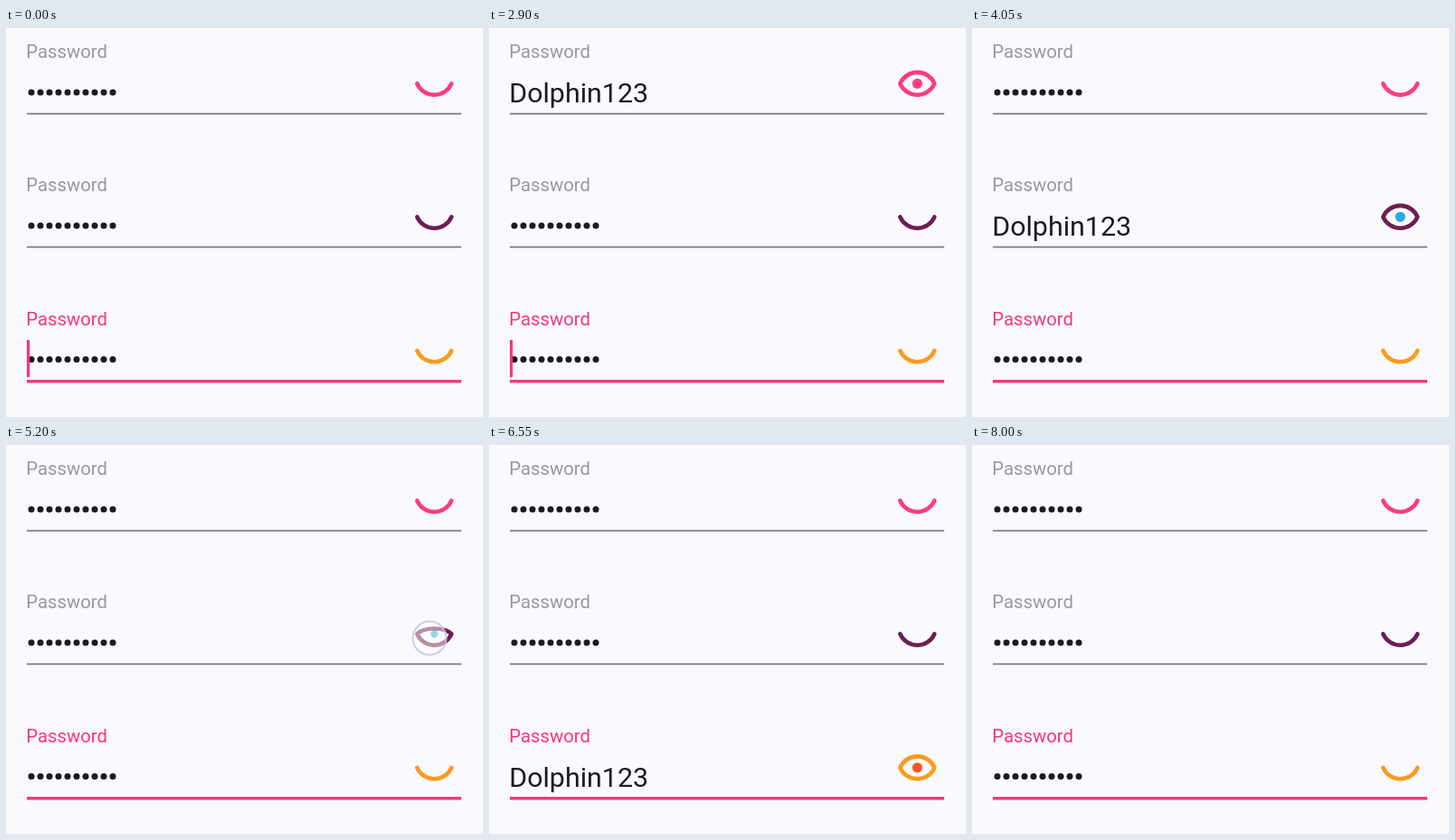
An HTML page for the animation above (8050 ms loop, 527 by 429 pixels).

```html
<!DOCTYPE html>
<html lang="en">
<head>
<meta charset="utf-8">
<title>Password fields</title>
<style>
  html, body { margin: 0; width: 100%; height: 100%; overflow: hidden; background: #faf9fd; }
  svg { display: block; }
  text { font-family: Roboto, sans-serif; }
  .label { font-size: 20.3px; }
  .value { font-size: 30.4px; fill: #1d1a20; }
</style>
</head>
<body>
<svg id="stage" width="527" height="429" viewBox="0 0 527 429"></svg>
<script>
const LOOP = 8050, EYE_MS = 300;
const PINK = '#f5377f', GREY = '#99989c';

// Each tap: press and release times, touch point, whether a ripple shows.
const fields = [
  { y: 0, eye: '#fb3d80', pupil: '#fb3d80',
    show: { press: 1350, release: 1500, x: 473, y: 68, ripple: true },
    hide: { press: 2950, release: 3050, x: 473, y: 66, ripple: true } },
  { y: 147, eye: '#6c1e50', pupil: '#2ba8ea',
    show: { press: 3550, release: 3700, x: 472, y: 67, ripple: true },
    hide: { press: 5100, release: 5150, x: 468, y: 66, ripple: false } },
  { y: 294.5, eye: '#fb9b1e', pupil: '#f2552c', focused: true,
    show: { press: 5750, release: 5900, x: 472, y: 66, ripple: true },
    hide: { press: 7300, release: 7500, x: 472, y: 66, ripple: false } }
];

// The caret is on at the start and flips at each of these times.
const caretFlips = [350, 850, 1350, 1900, 2400, 2900, 3400, 3900, 4050,
                    4400, 4900, 5400, 6400, 6900, 7400, 7500, 8000];

const stage = document.getElementById('stage');
const clamp = v => Math.max(0, Math.min(1, v));
const easeOut = p => Math.sin(clamp(p) * Math.PI / 2);

function add(parent, tag, attrs, text) {
  const el = document.createElementNS('http://www.w3.org/2000/svg', tag);
  set(el, attrs);
  if (text) el.textContent = text;
  parent.appendChild(el);
  return el;
}

function set(el, attrs) {
  for (const key in attrs) el.setAttribute(key, attrs[key]);
}

function build(f, i) {
  const g = add(stage, 'g', { transform: `translate(0 ${f.y})` });
  add(g, 'text', { class: 'label', x: 22.3, y: 33, fill: f.focused ? PINK : GREY }, 'Password');
  f.text = add(g, 'text', { class: 'value', x: 22.2, y: 82 }, 'Dolphin123');
  f.dots = add(g, 'g', { fill: '#1d1a20' });
  for (let n = 0; n < 10; n++) add(f.dots, 'circle', { cx: 28 + n * 10, cy: 71, r: 3.5 });

  add(g, 'rect', f.focused
    ? { x: 23, y: 93.5, width: 480, height: 3.4, fill: PINK }
    : { x: 23, y: 93.7, width: 480, height: 1.7, fill: '#79777c' });

  const box = add(g, 'clipPath', { id: 'box' + i });
  add(box, 'rect', { x: 443, y: 31, width: 60, height: 60 });
  f.ripple = add(g, 'circle', { cx: 473, cy: 61, 'clip-path': `url(#box${i})` });

  const eye = add(g, 'g', { transform: 'translate(473.2 61.3)' });
  const clip = add(eye, 'clipPath', { id: 'eye' + i });
  f.mask = add(clip, 'path', {});
  f.iris = add(eye, 'circle', { fill: f.pupil, 'clip-path': `url(#eye${i})` });
  f.outline = add(eye, 'path', {
    fill: 'none', stroke: f.eye, 'stroke-width': 4.6, 'stroke-linejoin': 'round'
  });
  f.touch = add(g, 'circle', {
    r: 18.5, fill: '#fff', 'fill-opacity': .5, stroke: '#c3c3e2', 'stroke-width': 2, 'stroke-opacity': .8
  });
}

// Almond whose upper lid drops onto the lower one as open goes from 1 to 0.
function eyePath(open) {
  const lid = 1 - 2 * open, a = 7.6 * lid, b = 12.4 * lid;
  return 'M-19 0C-15.7 7.6 -8.2 12.4 0 12.4S15.7 7.6 19 0' +
         `C15.7 ${a} 8.2 ${b} 0 ${b}S-15.7 ${a} -19 0Z`;
}

function drawField(f, t) {
  const { show, hide } = f;
  const visible = t >= show.release && t < hide.release;
  f.text.style.display = visible ? '' : 'none';
  f.dots.style.display = visible ? 'none' : '';

  const open = easeOut((t - show.release) / EYE_MS) - easeOut((t - hide.release) / EYE_MS);
  const d = eyePath(open);
  set(f.outline, { d });
  set(f.mask, { d });
  set(f.iris, { r: 5.6 * open });

  const tap = t < hide.press ? show : hide;
  const since = t - tap.press, after = t - tap.release;
  const pressed = since >= 0;
  set(f.touch, { cx: tap.x, cy: tap.y, opacity: pressed ? clamp((220 - after) / 150) : 0 });
  set(f.ripple, {
    r: 15 + 28 * clamp(since / 360),
    opacity: pressed && tap.ripple ? .06 * clamp((350 - after) / 200) : 0
  });
}

fields.forEach(build);
const caret = add(stage, 'rect', { x: 23, y: 344, width: 3.2, height: 41, fill: PINK });

function frame(now) {
  const t = now % LOOP;
  fields.forEach(f => drawField(f, t));
  const flips = caretFlips.filter(at => t >= at).length;
  caret.style.display = flips % 2 ? 'none' : '';
}

const start = performance.now();
function tick() {
  frame(performance.now() - start);
  requestAnimationFrame(tick);
}
tick();
</script>
</body>
</html>
```
